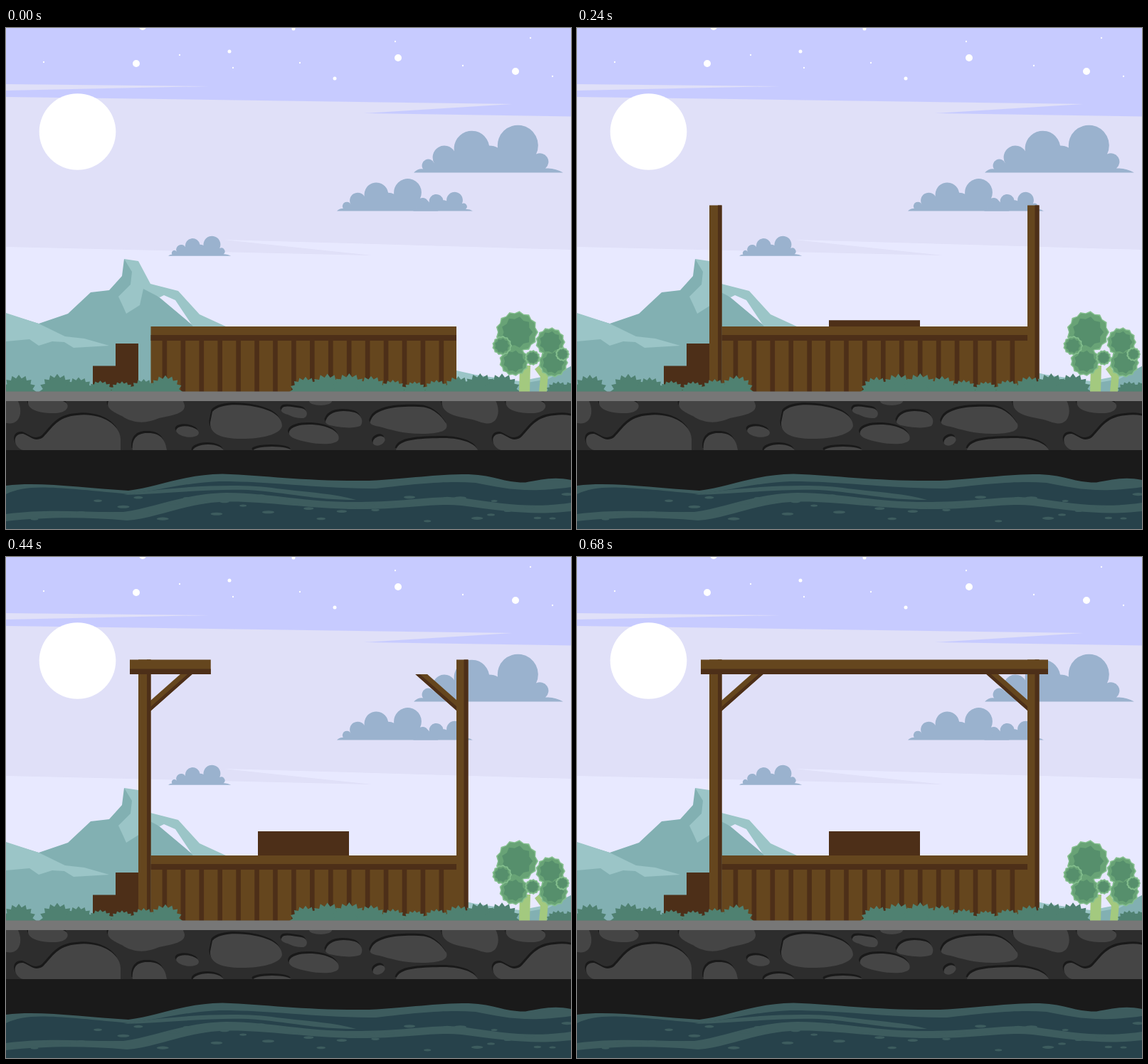
Write an HTML page that moves like this. It is 794 px wide and 705 px high and loops after 720 ms.

```html
<!DOCTYPE html>
<html lang="en">
<head>
<meta charset="utf-8">
<title>Wooden stage</title>
<style>
  html, body { margin: 0; width: 100%; height: 100%; overflow: hidden; }
  svg { display: block; }
  .wood { fill: #65461e; }
  .bark { fill: #4d2f18; }
  .far { fill: #82b0b2; }
  .snow { fill: #9bc5c7; }
</style>
</head>
<body>
<svg width="794" height="705" viewBox="0 0 794 705">
  <defs>
    <path id="cloud" d="M0 0Q6-6 13-5A9 9 0 1 1 29-13A16 16 0 0 1 57-30A24.800 24.800 0 0 1 106-38Q113-38 118-35A28.500 28.500 0 1 1 172-26A12 12 0 0 1 185-6Q198-7 210 0Z"/>
    <clipPath id="underBeam"><rect y="165" width="794" height="100"/></clipPath>
    <clipPath id="wall"><rect y="525" width="794" height="69"/></clipPath>
    <g id="edgeStones">
      <path d="M24 594C10 590 8 570 24 571C34 574 40 584 52 576C66 562 72 547 100 545C130 541 160 556 161 578V594Z"/>
      <path d="M-59 525C-60 545 -34 547 -16 551C0 556 8 560 16 552C22 544 21 534 17 525Z"/>
      <path d="M31 525C29 538 50 543 70 542C86 541 90 532 84 527L80 525Z"/>
    </g>
    <g id="stones">
      <use href="#edgeStones"/><use href="#edgeStones" x="671.500"/>
      <path d="M144 525C140 535 150 540 163 546C180 558 200 556 215 549C235 545 252 542 251 531L249 525Z"/>
      <path d="M178 594C176 578 185 569 200 570C218 570 224 580 226 594Z"/>
      <path d="M290 540C300 528 330 529 350 533C372 537 388 546 388 560C385 573 355 579 325 578C300 577 286 570 287 555Z"/>
      <path d="M388 535C392 530 405 534 415 535C425 537 425 547 418 549C408 549 402 547 396 544C388 542 385 539 388 535"/>
      <path d="M398 568C402 558 425 556 445 560C462 564 470 572 467 580C462 587 440 586 425 583C405 579 396 575 398 568"/>
      <path d="M450 551C455 538 475 537 490 541C500 544 503 555 498 560C485 565 465 561 455 559C449 557 448 554 450 551"/>
      <path d="M513 551C520 535 550 532 580 533C600 533 612 546 619 557C622 567 610 570 590 571C560 572 540 565 525 561C512 559 510 556 513 551"/>
      <path d="M548 594C552 578 580 578 610 577C640 576 660 585 663 594Z"/>
      <ellipse cx="255" cy="568" rx="16" ry="7.500" transform="rotate(8 255 568)"/>
      <ellipse cx="524" cy="581" rx="9" ry="6" transform="rotate(-25 524 581)"/>
      <ellipse cx="442" cy="525" rx="16" ry="6"/>
      <ellipse cx="284" cy="596" rx="22" ry="10"/>
      <ellipse cx="374" cy="595" rx="27" ry="6"/>
    </g>
  </defs>

  <rect width="794" height="705" fill="#c7cbff"/>
  <path d="M0 200H794V520H0Z" fill="#e8e9ff"/>
  <path d="M0 97L711 107L503 120L794 124.500V312L306 298L515 320L0 308ZM0 79L285 82L0 88Z" fill="#e0e0f8"/>
  <g fill="none" stroke="#fff" stroke-linecap="round">
    <path stroke-width="10" d="M192-2h0M183 50h0M551 42h0M716 61h0"/>
    <path stroke-width="5" d="M404 1h0M314 33h0M462 71h0"/>
    <path stroke-width="2.300" d="M53 48h0M244 38h0M319 56h0M413 49h0M547 19h0M642 53h0M737 14h0M768 68h0"/>
  </g>
  <circle cx="100.500" cy="146" r="53.800" fill="#fff"/>
  <g fill="#9ab2ce">
    <use href="#cloud" transform="translate(573 203.500)"/>
    <use href="#cloud" transform="translate(465 257.500) scale(.68)"/>
    <use href="#cloud" transform="translate(572 257.500) scale(.4)"/>
    <use href="#cloud" transform="translate(228 320.800) scale(.42)"/>
  </g>

  <path class="far" d="M0 402L46 416L87 402L119 372L145 369L163 349L166 325L180 335L200 366L263 419V512H0Z"/>
  <path class="snow" d="M166 325L186 328L203 360L242 370L272 403L310 420.500H263L238 383L222 376L216 379L193 367L188 390L169 402L165 393L158 378L175 361L177 343Z"/>
  <path class="snow" d="M0 401L46 416L83 434L110 437L145 447L95 450L82 442L65 441L46 447L33 438L0 441Z"/>
  <path class="snow" d="M633 482L660 488L722 497L768 488L794 476V512H633Z"/>
  <path class="far" d="M794 476L762 494L715 502L633 500V512H794Z"/>

  <path class="bark" d="M154 444H186V512H122V475.500H154Z"/>
  <rect id="box" class="bark" x="354" y="386" width="128" height="34.500"/>
  <rect class="wood" x="203.500" y="420" width="429.500" height="92"/>
  <rect class="bark" x="203.500" y="432" width="429.500" height="8"/>
  <path d="M219.600 476H633" stroke="#4d2f18" stroke-width="72" stroke-dasharray="6.600 19.330"/>
  <g id="braces" clip-path="url(#underBeam)"></g>
  <g id="posts">
    <path class="wood" d="M186 144.500H203.500V512H186ZM633 144.500H649.500V512H633Z"/>
    <path class="bark" d="M198 144.500H203.500V512H198ZM643.500 144.500H649.500V512H643.500Z"/>
  </g>
  <g id="beam">
    <rect class="wood" x="174" y="144.500" height="20.500"/>
    <rect class="bark" x="174" y="157.500" height="7.500"/>
  </g>

  <g id="bushes" fill="#4f8171"></g>
  <path d="M721 512L722 475H737L736 512ZM749 512L751 491L743 480L749 475L755 485H762L760 512Z" fill="#a3c97f"/>
  <g id="trees"></g>

  <rect y="511.500" width="794" height="14" fill="#777"/>
  <rect y="525" width="794" height="70" fill="#2d2d2d"/>
  <g clip-path="url(#wall)">
    <use href="#stones" x="-1.500" y="-3" fill="#191919"/>
    <use href="#stones" fill="#454545"/>
  </g>
  <rect y="594" width="794" height="111" fill="#1a1a1a"/>
  <g id="water" fill="#3d5c5e">
    <path d="M0 644C50 638 110 648 172 651C210 647 250 628 304 627.500C370 630 420 638 510 637C570 634 600 628 650 628C690 630 700 640 730 639.500C755 635 770 631 794 636V705H0Z"/>
    <path fill="#27424b" d="M0 656C30 642 60 645 172 656C220 650 250 640 300 638C380 638 430 648 520 648C580 641 620 637 660 640C700 648 730 655 794 646V705H0Z"/>
    <path d="M0 684C60 676 110 682 165 681C210 675 250 655 310 654C380 655 420 668 500 667C570 666 600 658 640 661C700 670 740 676 794 668V680C740 686 700 680 640 672C600 668 560 678 490 677C420 676 350 664 300 667C250 670 210 690 170 693C110 688 60 688 0 694Z"/>
    <path d="M165 657C230 645 330 640 380 648C430 654 460 655 492 664C430 664 400 654 340 650C290 648 230 655 165 657Z"/>
  </g>
</svg>
<script>
const $ = id => document.getElementById(id);
const add = (id, markup) => $(id).insertAdjacentHTML('beforeend', markup);
const clamp = (v, lo, hi) => Math.max(lo, Math.min(hi, v));

// Leafy outline: the radius alternates between tips and notches.
function leafy(cx, cy, rx, ry, tips, depth, fill) {
  const points = Array.from({ length: tips * 2 }, (_, i) => {
    const a = i * Math.PI / tips, k = i % 2 ? 1 - depth : 1;
    return [cx + rx * k * Math.cos(a), cy + ry * k * Math.sin(a)];
  });
  return `<polygon points="${points.join(' ')}" fill="${fill}"/>`;
}

// Bushes stand in evenly spaced rows; their height swells in a slow wave.
function bushRow(first, last, count) {
  for (let i = 0; i < count; i++) {
    const x = first + (last - first) * i / (count - 1);
    const h = 20.5 + 6 * Math.cos((x - 50) / 210 * 2 * Math.PI);
    add('bushes', leafy(x, 512, 8 + .7 * h, h, 16, .2, '#4f8171'));
  }
}
bushRow(18, 72, 2);
bushRow(102, 224, 5);
bushRow(421, 697, 10);
bushRow(776, 796, 2);

// Each layer is drawn across the whole group, so neighbouring blobs merge.
function foliage(blobs) {
  for (const [x, y, r] of blobs) add('trees', leafy(x, y, r, r, 13, .1, '#84bf8e'));
  for (const [x, y, r] of blobs) add('trees', leafy(x, y, r - 2, r - 2, 13, .08, '#68a376'));
  for (const [x, y, r] of blobs) add('trees', leafy(x, y, r * .74, r * .74, 9, .17, '#568f6c'));
}
foliage([[718, 428, 30], [714, 469, 21], [765, 442, 21], [769, 471, 21]]);
foliage([[697, 447, 14], [740, 464, 11], [782, 459, 10]]);

let seed = 7;
const random = () => (seed = seed * 16807 % 2147483647) / 2147483647;
for (let i = 0; i < 40; i++) {
  const x = 40 + 19 * i + 16 * random(), y = 656 + 38 * random(), r = 4 + 5 * random();
  add('water', `<ellipse cx="${x}" cy="${y}" rx="${r}" ry="${1 + r / 8}"/>`);
}

for (const side of ['translate(204 208.5)', 'translate(633 208.5) scale(-1 1)'])
  add('braces', `<g transform="${side} rotate(-41.5)">
    <rect class="wood" x="-8" y="-5.5" height="11"/><rect class="bark" x="-8" y="1.3" height="4.4"/></g>`);

const LOOP = 720, STEP = 40, SPEED = 1.75;
const grow = (t, start, length) => clamp(SPEED * (t - start), 0, length);
const drop = (id, y) => $(id).setAttribute('transform', `translate(0 ${y})`);
function setWidth(group, width) {
  for (const rect of group.children) rect.setAttribute('width', width);
}
const [leftBrace, rightBrace] = $('braces').children;

function draw(now) {
  const t = Math.floor(now % LOOP / STEP) * STEP;
  drop('posts', t < 80 ? 400 : clamp(245 - SPEED * (t - 160), 0, 357));
  drop('box', clamp(34 - .1625 * (t - 186), 0, 34));
  setWidth($('beam'), grow(t, 375, 488));
  setWidth(leftBrace, grow(t, 372, 88));
  setWidth(rightBrace, grow(t, 379.5, 88));
}

const begin = performance.now();
function tick() {
  draw(performance.now() - begin);
  requestAnimationFrame(tick);
}
tick();
</script>
</body>
</html>
```
